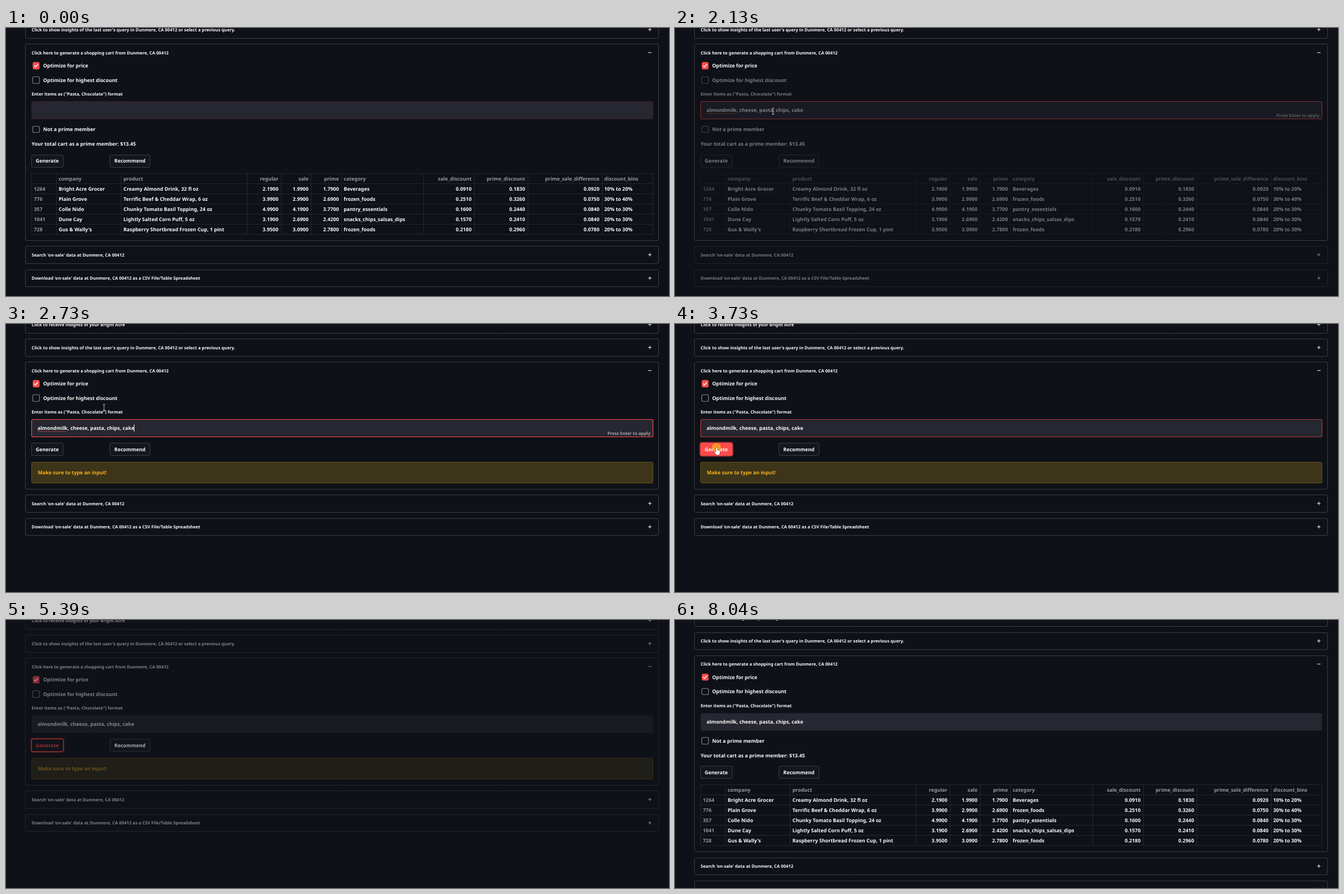
An HTML page with a canvas for the animation above (9040 ms loop, 1177 by 476 pixels).

```html
<!DOCTYPE html>
<html lang="en">
<head>
<meta charset="utf-8">
<title>Shopping cart</title>
<style>
  html, body { margin: 0; width: 100%; height: 100%; overflow: hidden; background: #0e1117; }
  canvas { display: block; width: 1177px; height: 476px; }
</style>
</head>
<body>
<canvas id="stage" width="1177" height="476"></canvas>
<script>
const ctx = document.getElementById("stage").getContext("2d");
ctx.textRendering = "geometricPrecision";

const LOOP = 9040, BIG = 8.9, SMALL = 7.7;
const BG = "#0e1117", INK = "#fafafa", RED = "#ff4b4b", LINE = "#3b3d43", MUTED = "#98999d";
const PLACE = "Dunmere, CA 00412";
const TYPED = "almondmilk, cheese, pasta, chips, cake";

const COLS = [45.5, 89.5, 204.5, 428.5, 488, 541.5, 595.5, 741.5, 831, 926, 1058, 1148];
const NUMERIC = new Set([3, 4, 5, 7, 8, 9]);
const ROWS = `|company|product|regular|sale|prime|category|sale_discount|prime_discount|prime_sale_difference|discount_bins
1264|Bright Acre Grocer|Creamy Almond Drink, 32 fl oz|2.1900|1.9900|1.7900|Beverages|0.0910|0.1830|0.0920|10% to 20%
776|Plain Grove|Terrific Beef & Cheddar Wrap, 6 oz|3.9900|2.9900|2.6900|frozen_foods|0.2510|0.3260|0.0750|30% to 40%
357|Colle Nido|Chunky Tomato Basil Topping, 24 oz|4.9900|4.1900|3.7700|pantry_essentials|0.1600|0.2440|0.0840|20% to 30%
1041|Dune Cay|Lightly Salted Corn Puff, 5 oz|3.1900|2.6900|2.4200|snacks_chips_salsas_dips|0.1570|0.2410|0.0840|20% to 30%
728|Gus & Wally's|Raspberry Shortbread Frozen Cup, 1 pint|3.9500|3.0900|2.7800|frozen_foods|0.2180|0.2960|0.0780|20% to 30%`
  .split("\n").map(row => row.split("|"));

// Pointer path: time, x, y
const PATH = [[70, 178, 470], [400, 180, 300], [660, 182.5, 170.5], [930, 174, 147], [2930, 174, 148],
  [3500, 74, 219.5], [4730, 74, 219.5], [5330, 543, 437]];

const clamp = v => Math.min(1, Math.max(0, v));
const ramp = (t, from, to) => clamp((t - from) / (to - from));
const mix = (a, b, k) => a + (b - a) * k;
const snap = v => Math.floor(v) + 0.5;
const alpha = a => { ctx.globalAlpha = a; };

// Returns the x of the text's right end when left-aligned
function text(str, x, y, size = BIG, color = INK, align = "left") {
  ctx.font = `600 ${size}px "Noto Sans", "Open Sans", sans-serif`;
  ctx.textAlign = align;
  ctx.fillStyle = color;
  ctx.fillText(str, x, y + size * 0.36);
  return x + ctx.measureText(str).width;
}

function box(x, y, w, h, fill, stroke, width = 1, radius = 2.5) {
  const left = snap(x), top = snap(y);
  ctx.beginPath();
  ctx.roundRect(left, top, snap(x + w) - left, snap(y + h) - top, radius);
  if (fill) { ctx.fillStyle = fill; ctx.fill(); }
  if (stroke) { ctx.strokeStyle = stroke; ctx.lineWidth = width; ctx.stroke(); }
}

function line(color, width, ...pts) {
  ctx.beginPath();
  for (let i = 0; i < pts.length; i += 2) ctx.lineTo(pts[i], pts[i + 1]);
  ctx.strokeStyle = color;
  ctx.lineWidth = width;
  ctx.stroke();
}

function expander(y, label, height = 30.5) {
  box(34.5, y, 1124, height, null, LINE);
  text(label, 45.5, y + 15.5, SMALL);
  line(INK, 1, 1140, y + 15.2, 1146, y + 15.2);
  if (height < 40) line(INK, 1, 1143, y + 12.2, 1143, y + 18.2);
}

function checkbox(y, label, checked) {
  if (checked) {
    box(47, y - 6.5, 12.5, 12.5, RED);
    line("#fff", 1.5, 49.8, y - 0.2, 52.3, y + 2.3, 56.8, y - 2.8);
  } else {
    box(47.5, y - 6, 11.5, 11.5, null, "#7c7e83", 1.2);
  }
  text(label, 66, y);
}

function button(x, y, w, label, look) {
  if (look === "active" || look === "focus") box(x - 1, y - 12, w + 2, 24, null, "rgba(255,75,75,.5)", 2.5, 3.5);
  box(x, y - 11, w, 22, look === "active" ? RED : "#13161d", look ? RED : LINE);
  text(label, x + w / 2, y, BIG, look && look !== "active" ? RED : INK, "center");
}

function input(y, t, focus) {
  const filled = t >= 1460, editing = t >= 1000 && t < 3660;
  box(45.5, y, 1102.5, 31, "#262730");
  if (focus > 0) {
    const base = ctx.globalAlpha;
    alpha(base * focus);
    box(45.5, y, 1102.5, 31, null, RED, 1.2);
    alpha(base);
  }
  const end = filled ? text(TYPED, 56, y + 15.5) : 56;
  if (!editing) return;
  if (filled) {
    text("Press Enter to apply", 1144, y + 24.5, SMALL, "#a4a5a8", "right");
    ctx.setLineDash([1.5, 1]);
    line(RED, 1, 56, y + 21.5, 107, y + 21.5);
    ctx.setLineDash([]);
  }
  if (!filled || (t - 1460) % 1070 < 530) line(INK, 1, snap(end), y + 9, snap(end), y + 21.5);
}

function table(y) {
  for (let i = 0; i <= 6; i++) line("#25272d", 1, 45.5, snap(y + i * 18), 1148, snap(y + i * 18));
  COLS.forEach(x => line("#25272d", 1, snap(x), y, snap(x), y + 108));
  ROWS.forEach((row, r) => row.forEach((cell, c) => {
    const right = NUMERIC.has(c);
    text(cell, right ? COLS[c + 1] - 4.5 : COLS[c] + 4, y + 9.5 + r * 18, BIG,
      r && c ? INK : MUTED, right ? "right" : "left");
  }));
}

function warning(y) {
  box(45.5, y, 1102.5, 37.5, "#3d351a", "#62531b");
  text("Make sure to type an input!", 56.5, y + 19, BIG, "#f6b21c");
}

// Opacity of each page part while the app reruns
function opacities(t) {
  const o = { outer: 1, form: 1, generate: 1, recommend: 1, warn: 1, table: 1, low: 1 };
  if (t >= 2130 && t < 2190) o.form = o.table = o.low = 0.45;
  else if (t >= 2190 && t < 2730) {
    o.form = o.low = mix(0.5, 1, ramp(t, 2190, 2390));
    o.table = 0.33;
  } else if (t >= 3860 && t < 7650) {
    const k = ramp(t, 3800, 5390) ** 1.6;
    o.outer = o.form = o.low = mix(1, 0.48, k);
    o.generate = mix(1, 0.5, k);
    o.recommend = mix(1, 0.65, k);
    o.warn = mix(1, 0.36, k);
  }
  return o;
}

function page(t) {
  const layout = t < 2190 || t >= 7650 ? "full" : t < 2730 ? "both" : "warn";
  const top = t < 2190 ? 28.5 : t < 2730 ? 24 : t < 7650 ? 67.5 : 63;
  const height = { full: 348.5, both: 378, warn: 225.5 }[layout];
  const o = opacities(t);

  alpha(o.outer);
  expander(top - 82, "Click to receive insights of your Bright Acre");
  expander(top - 41, `Click to show insights of the last user's query in ${PLACE} or select a previous query.`);
  expander(top, `Click here to generate a shopping cart from ${PLACE}`, height);
  checkbox(top + 38.5, "Optimize for price", true);

  alpha(o.form);
  checkbox(top + 64, "Optimize for highest discount");
  text('Enter items as ("Pasta, Chocolate") format', 45.5, top + 89, SMALL);
  const leftover = 0.12 * (1 - ramp(t, 0, 400));
  input(top + 102, t, leftover + ramp(t, 1000, 1200) * (1 - ramp(t, 3660, 3860)));

  if (layout === "full") {
    checkbox(top + 151.5, "Not a prime member");
    text("Your total cart as a prime member: $13.45", 45.5, top + 177.5);
  } else {
    const look = t < 3400 ? "" : t < 3660 ? "hover" : t < 3860 ? "active" : "focus";
    alpha(o.generate);
    button(45.5, top + 155, 55.5, "Generate", look);
    alpha(o.recommend);
    button(184.5, top + 155, 71, "Recommend");
    alpha(o.warn);
    warning(top + 177.5);
  }

  if (layout !== "warn") {
    const y = top + (layout === "full" ? 207.5 : 236.5);
    alpha(o.table);
    button(45.5, y, 55.5, "Generate");
    button(184.5, y, 71, "Recommend");
    table(y + 22);
  }

  alpha(o.low);
  expander(top + height + 10.5, `Search 'on-sale' data at ${PLACE}`);
  expander(top + height + 52, `Download 'on-sale' data at ${PLACE} as a CSV File/Table Spreadsheet`);

  alpha(0.55 * ramp(t, 270, 400) * (1 - ramp(t, 660, 900)));
  line(INK, 1, 1163.5, 266.5, 1163.5, 264, 1166, 264);
  line(INK, 1, 1166, 268.5, 1168.5, 268.5, 1168.5, 266);
  line(INK, 0.8, 1163.5, 264, 1168.5, 268.5);
  alpha(1);
}

function shape(x, y, pts) {
  ctx.beginPath();
  for (let i = 0; i < pts.length; i += 2) ctx.lineTo(x + pts[i], y + pts[i + 1]);
  ctx.closePath();
  ctx.fillStyle = "#fff";
  ctx.strokeStyle = "#111";
  ctx.lineWidth = 0.8;
  ctx.stroke();
  ctx.fill();
}

function ripple(t, start, x, y) {
  if (t < start || t >= start + 260) return;
  alpha(0.85 * (1 - ramp(t, start + 120, start + 260)));
  ctx.beginPath();
  ctx.arc(x, y, 8, 0, 7);
  ctx.fillStyle = "#ffa21f";
  ctx.fill();
  alpha(1);
}

function pointer(t) {
  ripple(t, 1000, 174, 147);
  ripple(t, 3660, 73.5, 219.5);
  if (t < 70 || t >= 5360) return;
  let i = 1;
  while (i < PATH.length - 1 && t > PATH[i][0]) i++;
  const [t0, x0, y0] = PATH[i - 1], [t1, x1, y1] = PATH[i];
  const k = ramp(t, t0, t1), x = mix(x0, x1, k), y = mix(y0, y1, k);
  if (t > 720 && t < 2930) {
    line("#d5d5d5", 0.9, x, y - 4.5, x, y + 5.5);
    line("#d5d5d5", 0.9, x - 2, y - 5, x + 2, y - 5);
    line("#d5d5d5", 0.9, x - 2, y + 5.5, x + 2, y + 5.5);
  } else if (t > 3400 && t < 4770) {
    shape(x, y, [-1, 0, 1, 0, 1.2, 4.5, 5.5, 5.5, 6, 7, 5.5, 10, 4.5, 13, -0.5, 13, -3.5, 9, -4, 7, -2.5, 7, -1, 8.5]);
  } else {
    shape(x, y, [0, 0, 0, 10, 2.2, 8, 3.8, 11.3, 5.2, 10.6, 3.8, 7.5, 6.8, 7.2]);
  }
}

const start = performance.now();
function frame() {
  const t = (performance.now() - start) % LOOP;
  ctx.fillStyle = BG;
  ctx.fillRect(0, 0, 1177, 476);
  page(t);
  pointer(t);
  requestAnimationFrame(frame);
}
frame();
</script>
</body>
</html>
```
